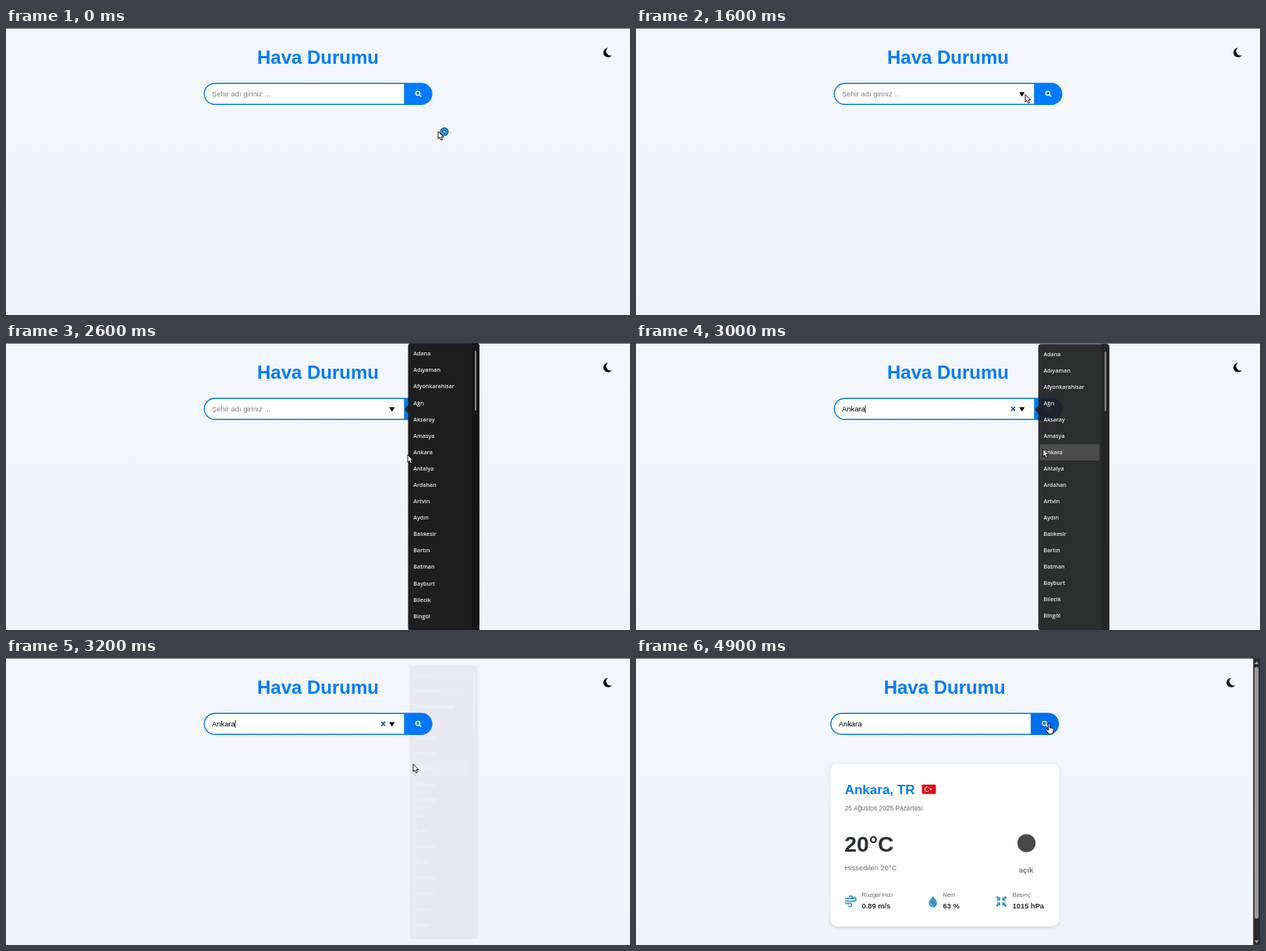
An HTML page that plays this animation: 800 px wide and 369 px high, repeating every 5000 ms.

```html
<!DOCTYPE html>
<html lang="tr">
<head>
<meta charset="utf-8">
<title>Hava Durumu</title>
<style>
  html, body { margin: 0; width: 100%; height: 100%; overflow: hidden; background: #f1f4f9; }
  svg { display: block; width: 100%; height: 100%; font-family: "Liberation Sans", Arial, sans-serif; }
  .bold { font-weight: bold; }
  .blue { fill: #007bff; }
  .muted { fill: #6c757d; }
  .dark { fill: #2c3035; }
  .label { font-size: 7.5px; fill: #5d646b; }
  #list { font: 600 7.15px "Open Sans", "Noto Sans", sans-serif; fill: #e8e8e8; }
  .icon { fill: none; stroke: #3a98c2; stroke-width: 1.7; stroke-linecap: round; stroke-linejoin: round; }
  .pointer { fill: #fff; stroke: #000; stroke-width: .9; stroke-linejoin: round; }
</style>
</head>
<body>
<svg viewBox="0 0 800 369">
  <defs>
    <linearGradient id="sky" x2="0" y2="1">
      <stop stop-color="#f3f6fb"/><stop offset="1" stop-color="#f0f4f8"/>
    </linearGradient>
    <filter id="shadow" x="-10%" y="-10%" width="120%" height="125%">
      <feDropShadow dx="0" dy="2" stdDeviation="2.5" flood-opacity=".13"/>
    </filter>
  </defs>
  <rect width="800" height="369" fill="url(#sky)"/>

  <path id="moon" d="M771.6 25.6A6 6 0 1 0 776.9 34.9A5.4 5.4 0 0 1 771.6 25.6Z"/>

  <g id="page">
    <text class="bold blue" x="400" y="46.4" font-size="24" text-anchor="middle">Hava Durumu</text>
    <path id="button" d="M511 70.5H532.4A14.2 14.2 0 0 1 532.4 98.9H511Z"/>
    <path d="M511 71.2H267.7A13.5 13.5 0 0 0 267.7 98.2H511Z" fill="#fff" stroke="#0a79e2" stroke-width="1.4"/>
    <g fill="none" stroke="#fff" stroke-width="1.4" stroke-linecap="round">
      <circle cx="528" cy="84" r="2.6"/><path d="M530 86L532 88"/>
    </g>
    <g font-size="9.4">
      <text id="hint" x="264" y="88" fill="#808080">Şehir adı giriniz ...</text>
      <text id="value" x="264" y="88">Ankara</text>
    </g>
    <rect id="caret" y="80" width=".8" height="10"/>
    <path id="clear" d="M481.1 82.2L486 87.2M486 82.2L481.1 87.2" stroke="#2c5a95" stroke-width="1.7"/>
    <path id="arrow" d="M491.3 82.6H498.3L494.8 88.2Z"/>

    <g id="card">
      <rect x="253.8" y="136.3" width="293" height="208.7" rx="9" fill="#fff" filter="url(#shadow)"/>
      <text class="bold blue" x="272" y="174.6" font-size="17">Ankara, TR</text>
      <rect x="370.8" y="162.7" width="18" height="12" rx="1.2" fill="#e30a17"/>
      <circle cx="377.2" cy="168.7" r="3.1" fill="#fff"/>
      <circle cx="378" cy="168.7" r="2.5" fill="#e30a17"/>
      <path d="M380.1 168.7L381.6 168.2 381.6 166.8 382.5 167.9 383.9 167.5 383.1 168.7 383.9 169.9 382.5 169.5 381.6 170.6 381.6 169.2Z" fill="#fff"/>
      <text x="272" y="196.3" font-size="8.4" fill="#636a70">25 Ağustos 2025 Pazartesi</text>
      <text class="bold dark" x="271.6" y="249" font-size="28.2">20°C</text>
      <text class="muted" x="272" y="272.8" font-size="9.4">Hissedilen 20°C</text>
      <circle cx="504.9" cy="238" r="11.6" fill="#484848"/>
      <text class="bold muted" x="504.5" y="276" font-size="9.4" text-anchor="middle">açık</text>
      <g id="details"></g>
      <path class="icon" d="M273 309.2H284M272.8 312.6H284.2A2.4 2.4 0 1 0 282 308.7M272.8 315.6H279A2 2 0 1 1 277.2 318.8M278.3 306.9A1.6 1.6 0 1 1 279.5 309.2"/>
      <path d="M385 306C387 309.4 390.3 312 390.3 315.2A5.3 5.3 0 0 1 379.7 315.2C379.7 312 383 309.4 385 306Z" fill="#3a98c2"/>
      <path d="M381.9 315.4A3.1 3.1 0 0 0 385 318.2" fill="none" stroke="#b9dcec" stroke-width=".9"/>
      <g id="compress"></g>
    </g>
  </g>

  <rect width="800" height="1" fill="#6a6c70"/>

  <g id="scrollbar">
    <rect x="791.3" width="9" height="369" fill="#2b2b2b"/>
    <rect x="793" y="11.5" width="5.2" height="323.5" rx="2.6" fill="#9c9c9c"/>
    <path d="M793 8H798.4L795.7 4Z M793 363H798.4L795.7 367Z" fill="#9c9c9c"/>
  </g>

  <g id="list">
    <path d="M516.5 79L511 85L516.5 91Z" fill="#1e1e1e"/>
    <rect x="515.5" y=".3" width="91.5" height="370" rx="4" fill="#1e1e1e"/>
    <path d="M597 .3H603A4 4 0 0 1 607 4.3V370H597Z" fill="#161616"/>
    <rect x="601" y="10" width="2" height="77" rx="1" fill="#858585"/>
    <rect id="row" x="517.5" y="129.8" width="77" height="21" rx="2" fill="#404040"/>
  </g>

  <g id="cursor">
    <g id="normal">
      <path class="pointer" d="M0 0V9.6L2.2 7.7L3.8 11.2L5.5 10.4L4 7H7Z"/>
      <g id="busy">
        <circle cx="8" cy=".3" r="3.5" fill="#fff" stroke="#123a5c" stroke-width="4"/>
        <circle cx="8" cy=".3" r="3.4" fill="none" stroke="#1c93e8" stroke-width="2.4"/>
      </g>
    </g>
    <path id="hand" class="pointer" d="M-1 1A1 1 0 0 1 1 1V5L5 6Q6.3 6.5 6 8L5.2 11V13.3H-1.2V11.6L-4.2 8Q-4.7 6.7 -3.2 6.8L-1 8.4Z"/>
    <path id="beam" d="M-2 -5H2M0 -5V5M-2 5H2" fill="none" stroke="#000" stroke-width=".9"/>
  </g>
</svg>
<script>
const $ = id => document.getElementById(id);
const show = (id, on) => $(id).style.display = on ? '' : 'none';
const add = (parent, markup) => $(parent).insertAdjacentHTML('beforeend', markup);

'Adana Adıyaman Afyonkarahisar Ağrı Aksaray Amasya Ankara Antalya Ardahan Artvin Aydın Balıkesir Bartın Batman Bayburt Bilecik Bingöl'
  .split(' ').forEach((city, i) => add('list', `<text x="522.3" y="${16.3 + i * 21.09}">${city}</text>`));

[[293.9, 'Rüzgar Hızı', '0.89 m/s'], [397.8, 'Nem', '63 %'], [487, 'Basınç', '1015 hPa']]
  .forEach(([x, label, value]) => add('details',
    `<text class="label" x="${x}" y="307.4">${label}</text>
     <text class="bold dark" x="${x}" y="321.6" font-size="9.3">${value}</text>`));

for (let turn = 0; turn < 360; turn += 90)
  add('compress', `<path transform="translate(472.6 313) rotate(${turn})" fill="#3a98c2"
    d="M1.3 1.3H6L4.7 2.7L7 5L5 7L2.7 4.7L1.3 6Z"/>`);

// Piecewise-linear track of [time, ...values]
function track(keys, t) {
  const i = keys.findIndex(k => k[0] > t);
  if (i < 0) return keys.at(-1).slice(1);
  const a = keys[Math.max(i - 1, 0)], b = keys[i];
  const p = Math.max(0, (t - a[0]) / (b[0] - a[0]));
  return a.slice(1).map((v, n) => v + (b[n + 1] - v) * p);
}

const cursorPath = [
  [0, 554, 133], [300, 537, 91], [600, 537, 91], [1200, 508, 88], [1600, 499, 85.5],
  [1800, 499, 85.5], [2200, 508, 151], [2400, 508, 151], [2800, 522, 136.5],
  [3500, 522, 136.5], [3900, 534, 60], [4000, 534, 60], [4300, 529.5, 84.5]
];
const hoverTrack = [[200, 0], [400, 1], [1100, 1], [1400, 0], [4100, 0], [4400, 1]];
const listTrack = [[1800, 1, 1], [2900, 1, 1], [3000, .93, .995], [3200, .045, .951], [3300, 0, .94]];
const cardTrack = [[4600, 0], [4900, 1]];

function draw(t) {
  const [x, y] = track(cursorPath, t);
  const [hover] = track(hoverTrack, t);
  const [alpha, scale] = track(listTrack, t);
  const open = t >= 1800 && t < 3300;
  const chosen = t >= 3000, loaded = t >= 4700, focused = t >= 1800 && t < 4600;

  const overButton = !open && x > 511 && x < 547 && y > 70 && y < 99;
  const overInput = !open && x > 502 && x <= 511 && y > 70 && y < 99;
  $('cursor').setAttribute('transform', `translate(${x} ${y})`);
  show('normal', !overButton && !overInput);
  show('busy', t < 200);
  show('hand', overButton);
  show('beam', overInput);

  $('button').setAttribute('fill', `rgb(0 ${123 - 13 * hover} ${255 - 18 * hover})`);
  show('hint', !chosen);
  show('value', chosen);
  show('clear', chosen && focused);
  show('arrow', t >= 1200 && t < 4600);
  show('caret', focused && !(t >= 2200 && t < 2700) && !(t >= 3500 && t < 3900) && t < 4500);
  $('caret').setAttribute('x', chosen ? 293.6 : 264);

  show('list', open);
  show('row', x > 518);
  $('list').setAttribute('opacity', alpha);
  $('list').setAttribute('transform', `translate(561 187) scale(${scale}) translate(-561 -187)`);

  show('scrollbar', loaded);
  show('card', loaded);
  $('card').setAttribute('opacity', track(cardTrack, t)[0]);
  $('page').setAttribute('transform', `translate(${loaded ? -4.3 : 0})`);
  $('moon').setAttribute('transform', `translate(${loaded ? -8.7 : 0})`);
}

function tick() {
  draw(Math.floor(performance.now() % 5000 / 100) * 100);
  requestAnimationFrame(tick);
}
tick();
</script>
</body>
</html>
```
